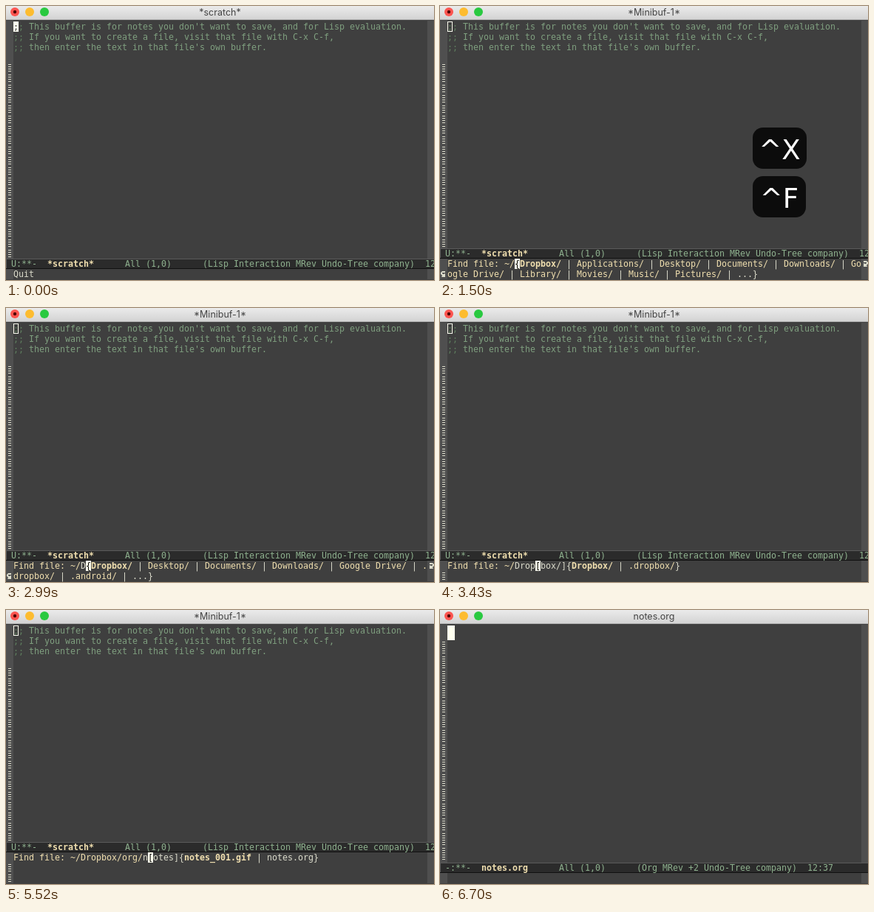
Animation, 579 px wide and 372 px high, one loop 8 s. Source, as an HTML page with a canvas:

```html
<!DOCTYPE html>
<html lang="en">
<head>
<meta charset="utf-8">
<title>Find file</title>
<style>
html, body { margin: 0; width: 100%; height: 100%; overflow: hidden; background: #3f3f3f; }
canvas { display: block; }
</style>
</head>
<body>
<canvas id="stage" width="579" height="372"></canvas>
<script>
const ctx = document.getElementById("stage").getContext("2d");
const W = 579, H = 372, LOOP = 8000;
const CELL = 7, ROW = 14, LEFT = 10, COLS = 80;
const MONO = '11.63px "DejaVu Sans Mono", monospace';
const C = {
  bg: "#3f3f3f", fringe: "#4f4f4f", fg: "#dcdccc", yellow: "#f0dfaf", cursor: "#ffffef",
  comment: "#7f9f7f", delimiter: "#5f7f5f", modeBg: "#2b2b2b", modeFg: "#8fb28f"
};
const CURLY = new Path2D("M2 0H6L8 2V4L6 6L7 8H2V3L4 4H5L6 3V2H2Z");

const COMMENTS = [
  "This buffer is for notes you don't want to save, and for Lisp evaluation.",
  "If you want to create a file, visit that file with C-x C-f,",
  "then enter the text in that file's own buffer."
];

// Completion prompts: directory, typed text, suggested rest, candidates.
const ido = (at, dir, typed, rest, list) => ({ at, dir, typed, rest, items: list.split(",") });
const PROMPTS = [
  ido(1500, "~/", "", "", "Dropbox/,Applications/,Desktop/,Documents/,Downloads/,Google Drive/,Library/,Movies/,Music/,Pictures/,..."),
  ido(2990, "~/", "D", "", "Dropbox/,Desktop/,Documents/,Downloads/,Google Drive/,.dropbox/,.android/,..."),
  ido(3140, "~/", "Dr", "", "Dropbox/,Google Drive/,.dropbox/,.android/"),
  ido(3290, "~/", "Dro", "", "Dropbox/,.dropbox/,.android/"),
  ido(3430, "~/", "Drop", "box/", "Dropbox/,.dropbox/"),
  ido(3730, "~/Dropbox/", "", "", "org/,Public/,Camera Uploads/,orgmode.org,EpamWiFiDoorman.apk,TODO.org,authorized_keys,concept.org,depo.org,interview.org,..."),
  ido(4330, "~/Dropbox/", "or", "", "org/,orgmode.org,EpamWiFiDoorman.apk,TODO.org,authorized_keys,concept.org,depo.org,interview.org,newmac.org,newyear.org,..."),
  ido(5070, "~/Dropbox/org/", "", "", "notes_001.gif,notes.org,concept.org,depo.org,interview.org,newmac.org,newyear.org,orgmode.org,TODO.org,gtd_archive.org,..."),
  ido(5520, "~/Dropbox/org/", "n", "otes", "notes_001.gif,notes.org"),
  ido(5660, "~/Dropbox/org/", "no", "tes", "notes_001.gif,notes.org"),
  ido(5810, "~/Dropbox/org/", "not", "es", "notes_001.gif,notes.org"),
  ido(5960, "~/Dropbox/org/", "note", "s", "notes_001.gif,notes.org"),
  ido(6410, "~/Dropbox/org/", "note", "s", "notes.org,notes_001.gif")
];

function rect(color, x, y, w, h) {
  ctx.fillStyle = color;
  ctx.fillRect(x, y, w, h);
}

function text(str, x, top, color, bold) {
  ctx.font = (bold ? "bold " : "") + MONO;
  ctx.fillStyle = color;
  ctx.textAlign = "left";
  ctx.fillText(str, x, top + 11);
}

function titleBar(title) {
  const shade = ctx.createLinearGradient(0, 0, 0, 18);
  shade.addColorStop(0, "#ebebeb");
  shade.addColorStop(1, "#d3d3d3");
  rect(shade, 0, 0, W, 18);
  rect("#b0b0b0", 0, 18, W, 1);
  const dot = (color, x, r) => {
    ctx.fillStyle = color;
    ctx.beginPath();
    ctx.arc(x, 8, r, 0, Math.PI * 2);
    ctx.fill();
  };
  ["#fc5550", "#fdbc2f", "#29c940"].forEach((color, i) => dot(color, 12 + 20 * i, 6));
  dot("#4d0000", 12, 2.2);
  ctx.font = "12.5px Inter, sans-serif";
  ctx.textAlign = "center";
  ctx.fillStyle = "#444";
  ctx.fillText(title, 289.5, 12.5);
}

function emptyMarks(from, to, rowHeight) {
  for (let row = from; row < to; row += rowHeight)
    for (let y = row + 2; y < Math.min(row + rowHeight - 1, to); y += 3)
      rect(C.fg, 3, y, 4, 1);
}

function modeLine(y, state, name, modes) {
  rect(C.modeBg, 0, y, W, ROW);
  rect("#5a5a5a", 0, y, W, 1);
  rect("#5a5a5a", 0, y, 1, ROW);
  rect("#101010", 0, y + ROW - 1, W, 1);
  text(" " + state, 0, y, C.modeFg);
  text(name, 8 * CELL, y, C.yellow, true);
  text("All (1,0)", 23 * CELL, y, C.modeFg);
  text(modes, 38 * CELL, y, C.modeFg);
}

function scratchBuffer(focused) {
  COMMENTS.forEach((line, i) => {
    const y = 21 + i * ROW;
    text(";;", LEFT, y, C.delimiter);
    text(line, LEFT + 3 * CELL, y, C.comment);
  });
  if (focused) {
    rect(C.cursor, LEFT, 21, CELL, ROW);
    text(";", LEFT, 21, C.bg);
  } else {
    ctx.strokeStyle = C.cursor;
    ctx.lineWidth = 1;
    ctx.strokeRect(LEFT + 0.5, 21.5, CELL - 1, ROW - 1);
  }
}

function curly(x, y, mirror) {
  ctx.save();
  ctx.translate(x, y);
  ctx.scale(mirror, 1);
  ctx.fillStyle = C.fg;
  ctx.fill(CURLY);
  ctx.restore();
}

function minibuffer({ dir, typed, rest, items }, top) {
  const cells = [];
  const put = (str, color = C.fg, bold = false) => {
    for (const ch of str) cells.push({ ch, color, bold });
  };
  put("Find file: " + dir, C.yellow);
  put(typed);
  const cursor = cells.length;
  if (rest) put("[" + rest + "]");
  put("{");
  items.forEach((item, i) => {
    if (i) put(" | ");
    put(item, i === 0 || item.endsWith("/") ? C.yellow : C.fg, i === 0);
  });
  put("}");

  cells.forEach(({ ch, color, bold }, i) => {
    const x = LEFT + (i % COLS) * CELL, y = top + Math.floor(i / COLS) * ROW;
    if (i === cursor) rect(C.cursor, x, y, CELL, ROW);
    text(ch, x, y, i === cursor ? "#000" : color, bold);
  });

  const lines = Math.ceil(cells.length / COLS);
  for (let i = 1; i < lines; i++) {
    curly(571, top + (i - 1) * ROW + 3, 1);
    curly(9, top + i * ROW + 3, -1);
  }
  emptyMarks(top + lines * ROW, 371, ROW);
}

function keyCap(label, y, width, alpha) {
  if (alpha <= 0) return;
  ctx.save();
  ctx.globalAlpha = alpha;
  ctx.fillStyle = "#0c0c0c";
  ctx.beginPath();
  ctx.roundRect(423, y, width, 56, 14);
  ctx.fill();
  ctx.font = '37px "DejaVu Sans", sans-serif';
  ctx.textAlign = "center";
  ctx.fillStyle = "#fff";
  ctx.fillText(label, 423 + width / 2, y + 42.5);
  ctx.restore();
}

// Opaque, then one half-faded step, then gone.
const fade = (t, start) => t < start ? 1 : t < start + 150 ? 0.5 : 0;

function draw(t) {
  const opened = t >= 6700;
  const prompt = opened ? null : PROMPTS.filter(p => t >= p.at).pop();
  const rows = !prompt ? 1 : t < 3730 ? 2 : 3;
  const miniTop = 371 - rows * ROW, modeTop = miniTop - ROW;

  rect(C.bg, 0, 0, W, H);
  rect(C.fringe, 0, 20, LEFT, H - 21);
  rect(C.fringe, 570, 20, 9, H - 21);
  titleBar(opened ? "notes.org" : prompt ? "*Minibuf-1*" : "*scratch*");

  if (opened) {
    rect(C.cursor, LEFT, 21, 10, 20);
    emptyMarks(41, modeTop, 20);
    modeLine(modeTop, "-:**-", "notes.org", "(Org MRev +2 Undo-Tree company)  12:37");
    return;
  }

  scratchBuffer(!prompt);
  emptyMarks(77, modeTop, ROW);
  modeLine(modeTop, "U:**-", "*scratch*", "(Lisp Interaction MRev Undo-Tree company)  12:37");

  if (prompt) minibuffer(prompt, miniTop);
  else if (t < 1200) text("Quit", LEFT, miniTop, C.fg);
  else if (t >= 1350) text("C-x-", LEFT, miniTop, C.fg);

  if (t >= 1200) keyCap("^X", t < 1500 ? 231 : 165, 73, fade(t, 1640));
  if (t >= 1500) keyCap("^F", 231, 72, fade(t, 1940));
}

const start = performance.now();
function tick() {
  draw((performance.now() - start) % LOOP);
  requestAnimationFrame(tick);
}
tick();
</script>
</body>
</html>
```
